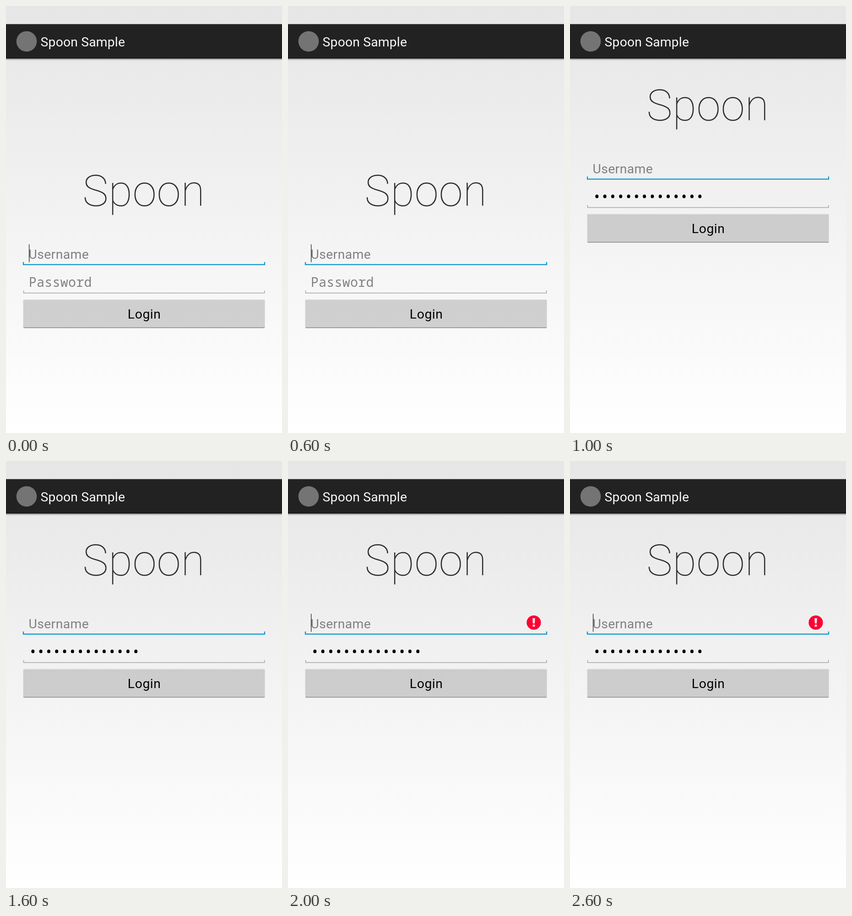
An HTML page that plays this animation: 603 by 929 pixels, repeating every 3 s.

```html
<!DOCTYPE html>
<html lang="en">
<head>
<meta charset="utf-8">
<title>Spoon Sample</title>
<style>
  html, body { margin: 0; width: 100%; height: 100%; overflow: hidden; background: #fff; }
  svg { display: block; width: 603px; height: 929px; }
  text { font-family: Roboto, sans-serif; font-size: 28.26px; white-space: pre; }
  .bar { fill: #f8f8f8; letter-spacing: .2px; }
  .logo { font-size: 95px; font-weight: 100; letter-spacing: .6px; fill: #2e2e2e; }
  .hint { fill: #808080; letter-spacing: .45px; }
  .mono { font-family: "Noto Sans Mono", monospace; letter-spacing: .31px; }
  .login { fill: #000; letter-spacing: .6px; }
</style>
</head>
<body>
<svg viewBox="0 0 603 929">
  <defs>
    <linearGradient id="sky" x1="0" y1="0" x2="0" y2="1">
      <stop offset="0" stop-color="#e6e6e6"/>
      <stop offset="1" stop-color="#fff"/>
    </linearGradient>
    <linearGradient id="shade" x1="0" y1="0" x2="0" y2="1">
      <stop offset="0" stop-opacity=".4"/>
      <stop offset="1" stop-opacity="0"/>
    </linearGradient>
  </defs>
  <rect width="603" height="929" fill="url(#sky)"/>

  <rect y="39.4" width="603" height="74.8" fill="#222"/>
  <rect y="112.4" width="603" height="1.8" fill="#151515"/>
  <rect y="114.2" width="603" height="4.4" fill="url(#shade)"/>
  <circle cx="45" cy="77" r="22.3" fill="#747474"/>
  <text class="bar" x="75.6" y="88">Spoon Sample</text>

  <g id="form">
    <text class="logo" x="301" y="435" text-anchor="middle">Spoon</text>

    <text class="hint" x="49.4" y="549.6">Username</text>
    <path d="M38 557V562.7H565V557" fill="none" stroke="#0a97cb" stroke-width="2.3"/>
    <rect id="caret" x="50" y="518.5" width="1.2" height="39" fill="#111"/>
    <g id="error">
      <circle cx="537" cy="537.5" r="15.6" fill="#fb0433"/>
      <path d="M534.2 528h5.6l-.7 11.6h-4.2zM534.6 542h4.8v4.4h-4.8z" fill="#fbe3e7"/>
    </g>

    <text id="empty" class="hint mono" x="49.8" y="611">Password</text>
    <g id="dots"></g>
    <path d="M38.5 619V624.5H564.7V619" fill="none" stroke="#a3a3a3" stroke-width="1.5"/>

    <rect x="37.6" y="638.4" width="528" height="62.4" rx="2" fill="#a8a8a8" fill-opacity=".5"/>
    <rect x="38.4" y="638.4" width="526.4" height="1.2" fill="#fff" fill-opacity=".3"/>
    <rect x="38" y="699" width="527.2" height="1.8" rx=".9" fill="#969696"/>
    <text class="login" x="302.2" y="680.4" text-anchor="middle">Login</text>
  </g>
</svg>
<script>
  const LOOP = 3000, STEP = 1000, LIFT = 186, DOTS = 14;
  const $ = id => document.getElementById(id);
  const show = (id, on) => $(id).setAttribute("visibility", on ? "visible" : "hidden");

  for (let i = 0; i < DOTS; i++) {
    const dot = document.createElementNS("http://www.w3.org/2000/svg", "ellipse");
    const attrs = { cx: 58.8 + i * 17.3, cy: 600.2, rx: 3.5, ry: 3.9 };
    for (const key in attrs) dot.setAttribute(key, attrs[key]);
    $("dots").append(dot);
  }

  function draw(ms) {
    const step = Math.floor((ms % LOOP) / STEP);
    const typed = step > 0;
    $("form").setAttribute("transform", `translate(0 ${typed ? -LIFT : 0})`);
    show("empty", !typed);
    show("dots", typed);
    show("caret", step !== 1);
    show("error", step === 2);
  }

  let start;
  function tick(now) {
    start ??= now;
    draw(now - start);
    requestAnimationFrame(tick);
  }
  draw(0);
  requestAnimationFrame(tick);
</script>
</body>
</html>
```
